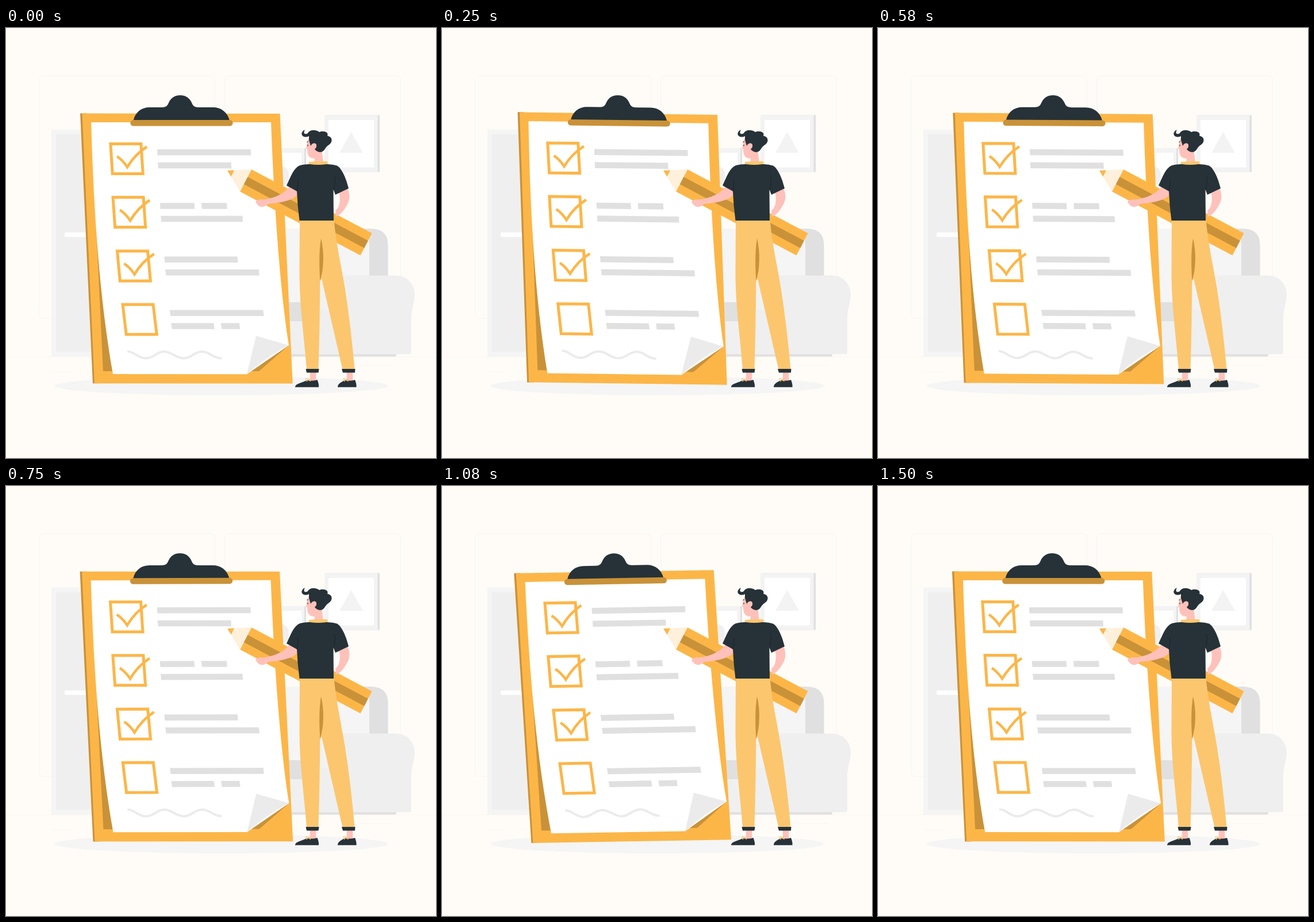
Animation, 748 px wide and 748 px high, one loop 1540 ms. Source, as an HTML page with a canvas:

```html
<!DOCTYPE html>
<html lang="en">
<head>
<meta charset="utf-8">
<title>Checklist</title>
<style>
  html, body { margin: 0; width: 100%; height: 100%; overflow: hidden; background: #fffcf8; }
  canvas { display: block; width: 748px; height: 748px; }
</style>
</head>
<body>
<canvas id="stage"></canvas>
<script>
const SIZE = 748;
const LOOP = 1540;
const STEPS = 37;
const SWAY = 1500;
const PIVOT = { x: 314, y: 368 };
const REST_ANGLE = 0.06;

const AMBER = '#fcb648', BRONZE = '#c99239', DARK = '#263238';
const SKIN = '#ffc1ba', PANTS = '#fcc66e', GREY = '#e0e0e0', FAINT = '#f9f4f0';

const canvas = document.getElementById('stage');
const ratio = window.devicePixelRatio || 1;
canvas.width = canvas.height = SIZE * ratio;
const ctx = canvas.getContext('2d');

function fill(color, d) {
  ctx.fillStyle = color;
  ctx.fill(new Path2D(d));
}

function stroke(color, width, d, cap = 'butt') {
  ctx.strokeStyle = color;
  ctx.lineWidth = width;
  ctx.lineCap = cap;
  ctx.stroke(new Path2D(d));
}

function rect(color, x, y, w, h, r = 0) {
  ctx.fillStyle = color;
  ctx.beginPath();
  ctx.roundRect(x, y, w, h, r);
  ctx.fill();
}

function drawRoom() {
  rect('#fffcf8', 0, 0, SIZE, SIZE);

  // Wall panels and floor lines
  for (const x of [57.5, 381]) {
    ctx.strokeStyle = FAINT;
    ctx.lineWidth = 1.2;
    ctx.beginPath();
    ctx.roundRect(x, 83, 305.5, 422.5, 7);
    ctx.stroke();
  }
  stroke(FAINT, 1.2, 'M0 572H748M81 598H111M140 598H150M617 587H673');

  // Cabinet
  rect('#f5f5f5', 79, 176.5, 200, 395.5);
  rect('#efefef', 87, 185, 190, 378);
  rect('#fff', 101.5, 355.5, 70, 8, 4);

  // Pictures
  rect(GREY, 440, 209, 82, 62);
  rect('#f3f3f3', 436, 209, 83, 62);
  rect('#fff', 440, 217, 74, 46);
  fill('#f0f0f0', 'M468 255A12 14 0 0 1 492 255V272H468Z');
  rect(GREY, 558, 151.5, 92, 99);
  rect('#f3f3f3', 554, 151.5, 92.5, 99);
  rect('#fff', 561, 160, 79, 82.5);
  fill('#f3f3f3', 'M600.5 181L621 217H580Z');

  // Sofa
  rect(GREY, 450, 565, 229, 6.5, 3);
  fill(GREY, 'M600 349H636Q664.5 350 664.5 378V436H600Z');
  fill('#f5f5f5', 'M450 349H606Q632 350 632 376V480H450Z');
  rect(GREY, 450, 477, 90, 34);
  rect('#f0f0f0', 450, 510, 150, 57.5);
  fill('#efefef', 'M545 430.5H678C698 430.5 711 446 711 464C711 478 705 488 705 504V564Q705 567.5 701 567.5H545Z');
  fill('#f2f2f2', 'M545 431H566C583 431 594 447 594 463C594 479 586 488 577 493L545 490Z');

  ctx.fillStyle = '#f5f5f5';
  ctx.beginPath();
  ctx.ellipse(374.5, 622.5, 290, 16.5, 0, 0, Math.PI * 2);
  ctx.fill();
}

function drawBar(left, right, top, skew) {
  const h = 10.5;
  fill(GREY, `M${left} ${top}H${right}L${right + skew} ${top + h}H${left + skew}Z`);
}

function drawBox(x, y, slant) {
  stroke(AMBER, 5, `M${x} ${y}h53l${slant} 52h-53Z`);
}

function drawTick(x, y) {
  ctx.save();
  ctx.translate(x, y);
  stroke(AMBER, 4.5, 'M-17 -18.5Q-7 -12 1 0Q14 -22 35 -35.5');
  ctx.restore();
}

function drawClipboard(angle) {
  ctx.save();
  ctx.translate(PIVOT.x, PIVOT.y);
  ctx.rotate(angle * Math.PI / 180);
  ctx.translate(-PIVOT.x, -PIVOT.y);

  fill(BRONZE, 'M129 148.5H140L162 618.3H151Z');
  fill(AMBER, 'M132.5 148.5L476.5 149L498.7 618.5L154 618.2Z');

  // Paper with its shadow and folded corner
  fill(BRONZE, 'M148 164L169 597H187L170 400Z');
  fill(BRONZE, 'M491 553L440 597H422Z');
  fill('#fff', 'M148 164H461C466 300 476 450 492 552L419 602.3L186 602C163 470 153 330 148 164Z');
  fill('#ebebeb', 'M435 535.5L492 552Q453 571 419 602.3Z');

  // Clip
  fill(DARK, 'M221.5 161C225 146 236 138 250 138H271C280 138 281 134 283 130C287 121 294 117 303 117S319 121 323 130C325 134 326 138 335 138H360C374 138 385 146 389 161Z');
  rect(BRONZE, 216.3, 160, 178.2, 10.5, 5.2);

  drawBox(181.8, 201.5, 3.4);
  drawBox(186, 294.5, 3.6);
  drawBox(193.5, 388, 4.8);
  drawBox(203, 481, 6.2);
  drawTick(210, 242);
  drawTick(215, 335);
  drawTick(222.5, 428.5);

  drawBar(263, 425.5, 211, 0.6);
  drawBar(264, 391.5, 233.7, 0.7);
  drawBar(267.7, 327.5, 304.3, 0.8);
  drawBar(340, 384, 304.3, 0.8);
  drawBar(269.2, 411.3, 326.8, 0.9);
  drawBar(275.2, 402.5, 397.5, 1.1);
  drawBar(277.2, 439.6, 420, 1.2);
  drawBar(284.8, 447.2, 490.5, 1.5);
  drawBar(287.2, 361.3, 513.2, 1.5);
  drawBar(373.8, 405.8, 513.2, 1.5);

  stroke('#ebebeb', 4, 'M211 562.5C224 562.5 228 574.5 243 574.5S261 563 275 563S295 574.5 309 574.5S327 563 341 563S359 574.5 375 574.5');
  ctx.restore();
}

function drawPencil() {
  fill(AMBER, 'M427 246L636.5 357L616.5 395.5L407 284.5Z');
  fill(BRONZE, 'M420.3 259L629.8 370L623.2 382.7L413.7 271.7Z');
  fill('#fff0dc', 'M385 248L427 246L407 284.5Z');
  fill(AMBER, 'M385 248L397 247.4L391.5 258.5Z');
}

function drawShoe(x, length) {
  ctx.save();
  ctx.translate(x, 612);
  fill(DARK, `M-${length} 12C-${length - 1} 6 -7 5 1 0Q8 3 18 0Q21 7 20.5 12.7H-${length}Z`);
  stroke(PANTS, 1.3, 'M-3 -1Q2 -4 4 2M-1 3Q5 -4 6 3');
  ctx.restore();
}

function drawMan() {
  // Far arm
  fill(SKIN, 'M573 288L594.5 279C599 292 598 301 592 310C587 319 580 326 574 328.5L573 318C580 312 582 303 580 288Z');

  // Ankles, shoes and cuffs
  fill(SKIN, 'M529 597H539.5L539 614H528.5ZM592.5 597H603L603.5 614H593Z');
  drawShoe(523.5, 20.5);
  drawShoe(589, 12);

  // Trousers
  fill(PANTS, 'M511 333H570.5C574 375 583 412 590 455Q600 520 606.5 594H585.5L549 436L546.3 440Q546 510 543.5 594H523C518 530 510 480 510.5 420Z');
  fill(BRONZE, 'M548 366C544 392 545 415 546.3 440C553 420 554 390 548 366Z');
  fill(DARK, 'M521.5 593H544.5L543.5 599.5H523ZM584 593H607.5L607 599.5H586Z');

  // Near arm
  fill(SKIN, 'M493 276C484 288 468 296 448 298.5C441 297.5 435 299 434 303L439 309C445 313 451 311 456 306C478 304 499 300 507 290V278Z');

  // Neck, face and ear
  fill(SKIN, 'M527 191C523 198 524 202 522 209L524 211C524 221 527 227 537 227L536 235H552L549 210Z');
  fill(PANTS, 'M527 233Q544 231 559 232L560 239H526Z');
  stroke(DARK, 1.2, 'M523.5 198.5L526 197.5M525 203V205.5');

  // Hair
  fill(DARK, 'M527 195L530 205C534 198 541 200 540 206C539 209 537 210 537 211C541 216 548 218 553 213C556 209 557 206 562 203C569 198 568 189 559 187.5C562 181 552 178 545 181C538 176 528 177 525 183C521 186 516 184 520 177C513 180 512 188 520 189.5Q524 190 527 188Z');
  fill(SKIN, 'M531 206C532 199 541 199 540 206C539 210 536 212 533 211Z');

  // Shirt
  fill(DARK, 'M511 239Q520 236.5 529 237Q543 239 557 237Q568 236.5 576 239.5C585 245 592 263 596 279L573 290L569.5 281L570 335H510.5Q507 309 506 284L488 274C495 259 500 244 511 239Z');
  stroke('#1b252a', 1, 'M571 256Q574 268 570 281M508 264Q508 276 506 284');
}

function draw(now) {
  // The sway advances in held steps, about 24 per second
  const step = Math.floor((now % LOOP) / LOOP * STEPS + 0.1);
  const phase = ((25 + step * 41.3) / SWAY) % 1;
  const wave = Math.abs(((phase + 0.25) % 1) - 0.5);
  const angle = 1 - 4 * wave;

  ctx.setTransform(ratio, 0, 0, ratio, 0, 0);
  drawRoom();
  drawClipboard(angle - REST_ANGLE);
  drawPencil();
  drawMan();
}

let start;
function tick(now) {
  start ??= now;
  draw(now - start);
  requestAnimationFrame(tick);
}
draw(0);
requestAnimationFrame(tick);
</script>
</body>
</html>
```
